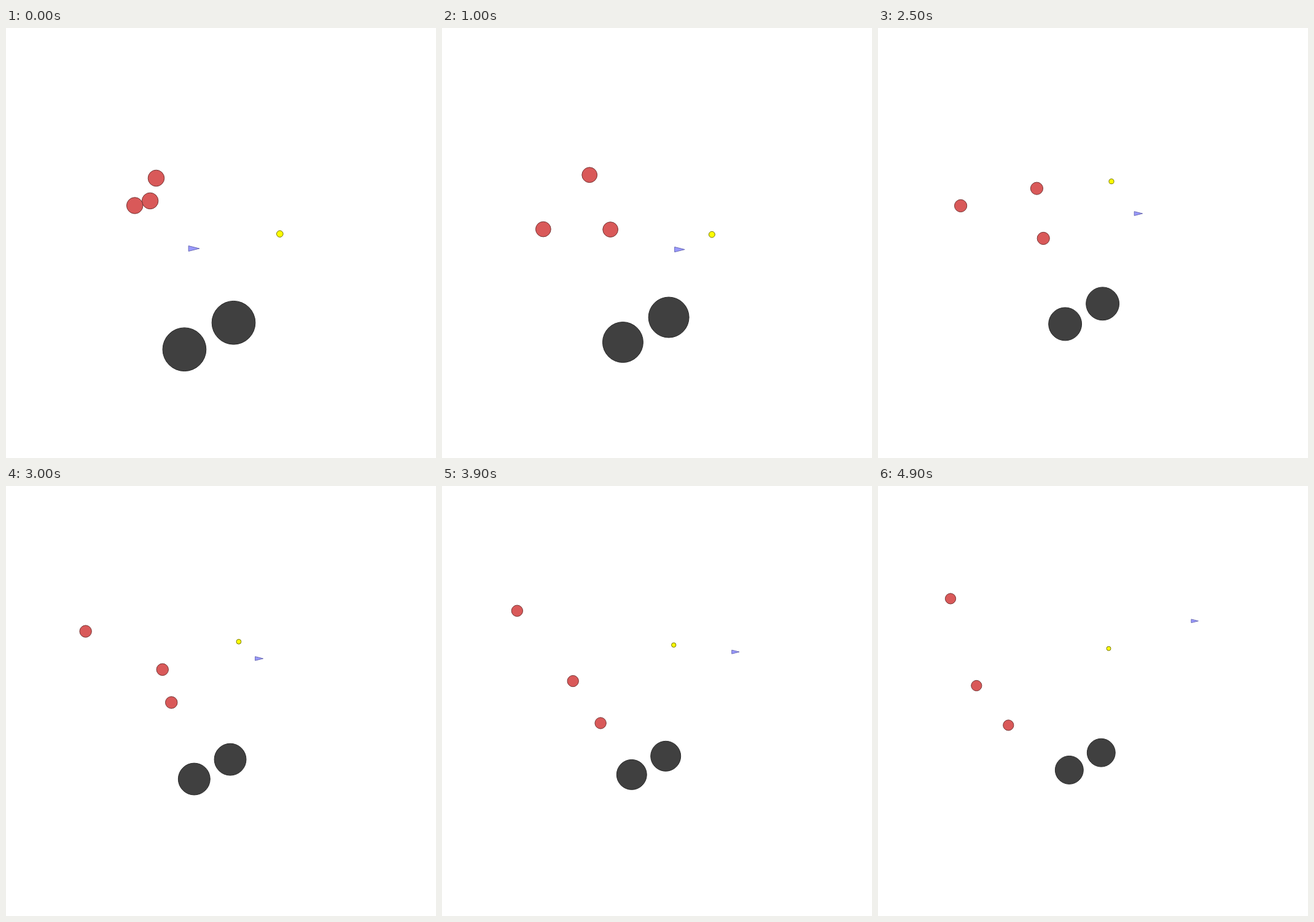
An HTML page with a canvas for the animation above (5 s loop, 700 by 700 pixels).

```html
<!DOCTYPE html>
<html lang="en">
<head>
<meta charset="utf-8">
<title>Chase</title>
<style>
html, body { margin: 0; width: 100%; height: 100%; overflow: hidden; background: #fff; }
canvas { display: block; width: 700px; height: 700px; }
</style>
</head>
<body>
<canvas id="stage" width="700" height="700"></canvas>
<script>
const ctx = document.getElementById('stage').getContext('2d');
const SIZE = 700, MID = SIZE / 2, STEP = 100, STEPS = 50;

// Turning points in world units: [step, x, y]
const runner = [
  [0, -.249, .051], [6, .505, .12], [10, .224, .064], [17, .642, -.117],
  [25, .549, -.356], [30, .479, -.533], [39, 1.045, -.653], [49, 1.445, -1.136]
];
const west = [
  [0, -.794, -.345], [10, -1.123, -.136], [17, -1.274, -.065],
  [25, -1.6, -.45], [30, -1.7, -.875], [36, -1.735, -1.19],
  [39, -1.861, -1.2], [45, -2.046, -1.31], [49, -2.023, -1.453]
];
const north = [
  [0, -.597, -.597], [10, -.666, -.672], [17, -.668, -.746], [25, -.68, -.66],
  [30, -.735, -.395], [39, -1.118, -.265], [49, -1.654, -.218]
];
const south = [
  [0, -.653, -.388], [10, -.46, -.133], [17, -.415, -.101], [25, -.6, -.056],
  [30, -.623, .019], [39, -.751, .294], [49, -1.201, .344]
];
const rocks = [[-.337, .98], [.116, .734]];
const meals = [[.542, -.084], [.223, -.745]];
const EATEN = 15;

function slope(path, i, axis) {
  const a = path[Math.max(0, i - 1)], b = path[Math.min(path.length - 1, i + 1)];
  return (b[axis] - a[axis]) / (b[0] - a[0]);
}

// Smooth cubic through the turning points
function at(path, n) {
  let i = 0;
  while (i < path.length - 2 && path[i + 1][0] <= n) i++;
  const a = path[i], b = path[i + 1], span = b[0] - a[0];
  const u = (n - a[0]) / span, v = 1 - u;
  return [1, 2].map(k =>
    a[k] * v * v * (1 + 2 * u) + b[k] * u * u * (3 - 2 * u) +
    span * u * v * (slope(path, i, k) * v - slope(path, i + 1, k) * u));
}

// The view only ever widens, following the farthest body
function scaleAt(n) {
  let reach = rocks[0][1];
  for (let k = 0; k <= n; k++) reach = Math.max(reach, -at(west, k)[0]);
  return MID / (reach + 1);
}

function paint(fill, line) {
  ctx.fillStyle = fill;
  ctx.strokeStyle = line;
  ctx.fill();
  ctx.stroke();
}

function disc([x, y], r, s, fill, line) {
  ctx.beginPath();
  ctx.arc(MID + x * s, MID + y * s, r * s, 0, Math.PI * 2);
  paint(fill, line);
}

function dart([x, y], r, s) {
  const cx = MID + x * s, cy = MID + y * s, d = r * s;
  ctx.beginPath();
  ctx.moveTo(cx - d, cy - d / 2);
  ctx.lineTo(cx + d, cy);
  ctx.lineTo(cx - d, cy + d / 2);
  ctx.closePath();
  paint('#9999ff', '#6c6cb4');
}

function draw(n) {
  const s = scaleAt(n);
  ctx.clearRect(0, 0, SIZE, SIZE);
  ctx.lineJoin = 'bevel';
  for (const p of rocks) disc(p, .2, s, '#404040', '#282828');
  for (const path of [north, south, west]) disc(at(path, n), .075, s, '#d95959', '#743434');
  disc(meals[n < EATEN ? 0 : 1], .03, s, '#ffff00', '#747400');
  dart(at(runner, n), .05, s);
}

const start = performance.now();
function tick() {
  draw(Math.floor((performance.now() - start) / STEP) % STEPS);
  requestAnimationFrame(tick);
}
tick();
</script>
</body>
</html>
```
